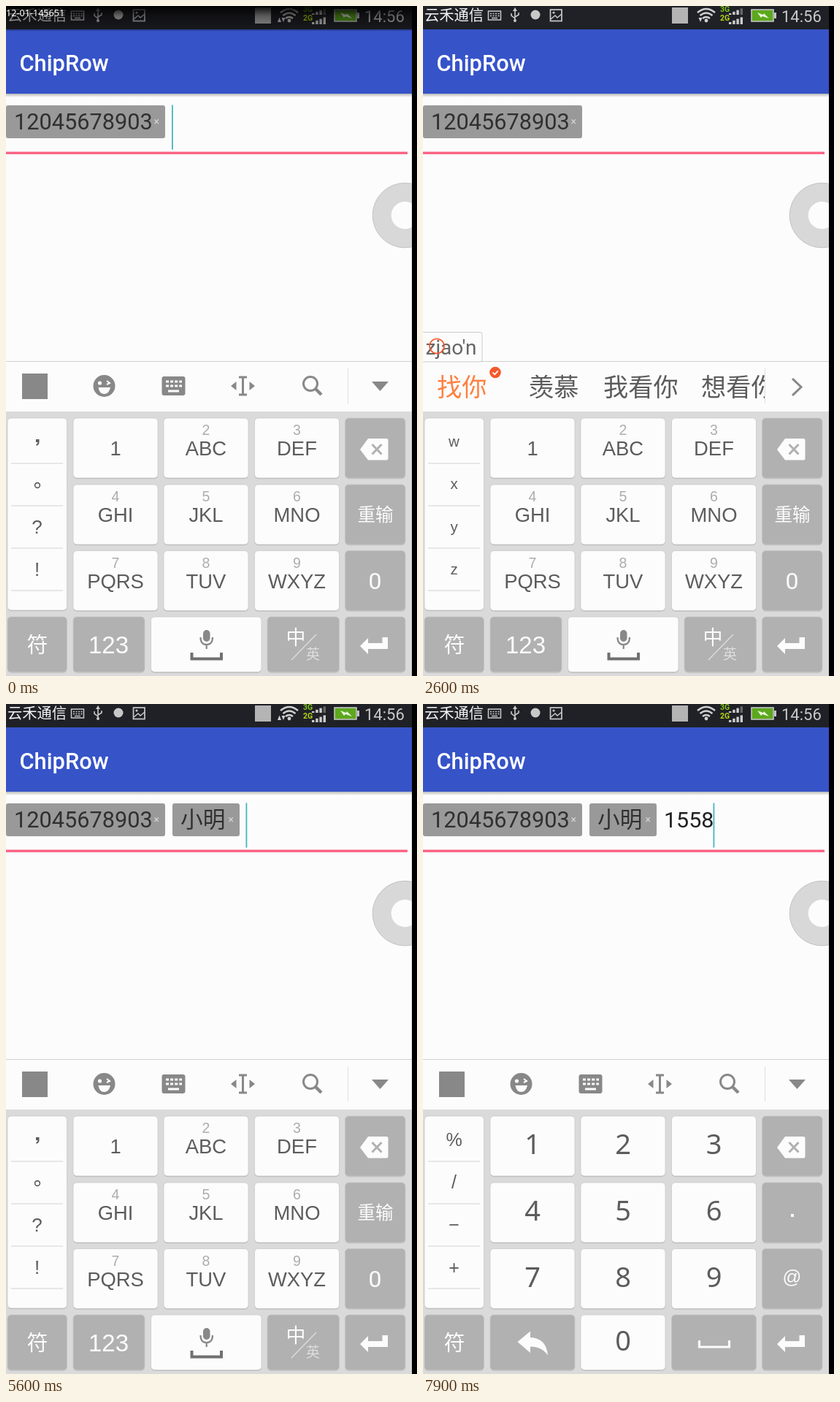
Recreate the animation shown at these times as an HTML page. Size 563 by 917 pixels, loop 8000 ms.

```html
<!DOCTYPE html>
<html lang="zh-CN">
<head>
<meta charset="utf-8">
<style>
html, body { margin: 0; width: 100%; height: 100%; overflow: hidden; background: #000; }
svg { display: block; width: 563px; height: 917px; font-family: Roboto, "Noto Sans CJK SC", "Noto Sans CJK", sans-serif; }
.key { font-family: "Liberation Sans", "Noto Sans CJK SC", "Noto Sans CJK", sans-serif; }
.num { font-family: "Noto Sans", "Open Sans", sans-serif; }
text { white-space: pre; }
</style>
</head>
<body>
<svg id="stage" viewBox="0 0 563 917"></svg>
<script>
const LOOP = 8000, STEP = 100;
const INK = '#5c5c5c', ICON = '#888', ORANGE = '#ff8040', RED = '#f4592c', GREY = '#b1b1b1', PAPER = '#fcfcfc';
const stage = document.getElementById('stage');

// Timelines: [start, value]; a value holds until the next start.
const pinyin = [[0, ''], [700, 'w'], [1000, 'wj'], [1200, 'zja'], [1400, 'zjao'], [1600, "zjao'n"],
  [2700, "zjao'ni"], [3000, "zjao'ni'm"], [3200, "xjao'ming"], [4000, '']];
const candidates = [[0, null],
  [700, [['我', 19], ['掌', 95], ['中', 162], ['讯', 227], ['在', 294], ['有', 360], ['要', 426]]],
  [1000, [['我就', 19], ['下降', 112], ['文件', 212], ['许久', 312], ['眼睛', 412]]],
  [1200, [['找', 19], ['需', 145], ['小', 212], ['要', 279], ['照', 346], ['咬', 413]]],
  [1600, [['找你', 19], ['羡慕', 145], ['我看你', 247], ['想看你', 381]]],
  [2700, [['找你', 19], ['咬你', 145], ['我看你', 247], ['想看你', 381]]],
  [3000, [['找你们', 19], ['小米', 179], ['想你们', 281], ['找你', 415]]],
  [3200, [['小名', 19], ['小明', 145], ['WLAN明', 247], ['WLAN名', 408]]],
  [4000, [['同学', 19], ['说', 124], ['老师', 192], ['明天', 294], ['和', 396]]],
  [5500, null]];
const pressed = [[0, ''], [600, 'WXYZ'], [700, ''], [900, 'JKL'], [1000, ''], [1100, 'ABC'], [1200, ''],
  [1300, 'MNO'], [1400, ''], [1500, 'MNO'], [1600, ''], [5400, 'space'], [5600, ''], [6800, '123'], [6900, ''],
  [7200, '1'], [7300, ''], [7500, '5'], [7600, ''], [7700, '5'], [7800, '8'], [7900, '']];
const typed = [[0, ''], [4000, '小明'], [5500, ''], [7200, '1'], [7500, '15'], [7700, '155'], [7900, '1558']];
const caretX = [[0, 228], [4000, 290], [5500, 329.5], [7200, 347], [7500, 364], [7700, 381], [7900, 398.5]];
const caretToggles = [0, 500, 1000, 1500, 2000, 2600, 3000, 3500, 4000, 4600, 5000, 5400, 5600, 6000, 6400, 6900, 7200];

const at = (list, t) => list.filter(([start]) => start <= t).pop()[1];
const rect = (x, y, w, h, fill, extra = '') => `<rect x="${x}" y="${y}" width="${w}" height="${h}" fill="${fill}" ${extra}/>`;
const circle = (x, y, r, fill, extra = '') => `<circle cx="${x}" cy="${y}" r="${r}" fill="${fill}" ${extra}/>`;
const path = (d, fill, extra = '') => `<path d="${d}" fill="${fill}" ${extra}/>`;
const line = (d, color, width, extra = '') => path(d, 'none', `stroke="${color}" stroke-width="${width}" ${extra}`);
const text = (s, x, y, size, fill, extra = '') => `<text x="${x}" y="${y}" font-size="${size}" fill="${fill}" ${extra}>${s}</text>`;
const label = (s, x, y, size, fill, cls = 'key') => text(s, x, y, size, fill, `text-anchor="middle" class="${cls}"`);

function statusBar(t) {
  let s = rect(0, 0, 556, 32, '#202126') + text('云禾通信', 2, 20, 20.3, '#f4f4f4');
  s += rect(89.5, 7, 17, 12, 'none', 'stroke="#c8c8c8" stroke-width="1.5"');
  s += line('M92 10.5H105M92 13.5H105', '#c8c8c8', 1.7, 'stroke-dasharray="2 1.5"') + line('M94 16.5H102', '#c8c8c8', 1.5);
  s += line('M126 5V20M121 10V13L126 17M131 9V12L126 15', '#c8c8c8', 1.6) + circle(126, 20, 2, '#c8c8c8') + path('M123 7L126 2L129 7Z', '#c8c8c8');
  s += circle(154, 12, 6.5, '#c8c8c8');
  s += rect(174.5, 5, 15.5, 15.5, 'none', 'stroke="#c8c8c8" stroke-width="1.7"') + line('M175 18L181 13L184 16L190 11', '#c8c8c8', 1.5) + circle(179, 9, 1.6, '#c8c8c8');
  s += rect(341, 2, 22, 22, '#b4b4b4');
  s += line('M376 9Q388 -1 400 9M379.5 13Q388 6 396.5 13M383 17Q388 13 393 17', '#d0d0d0', 2.4) + circle(388, 20, 2.4, '#d0d0d0');
  if (t < 1300 || (t >= 2600 && t < 6200)) {
    s += path('M377.5 16H382.5L380 22Z', '#d0d0d0');
    if (t < 1300 || t >= 5200) s += path('M372 22H377L374.5 15.5Z', '#d0d0d0');
  }
  s += text('3G', 407, 8, 10.5, '#80c41c', 'font-weight="700"') + text('2G', 407, 20, 10.5, '#b4d614', 'font-weight="700"');
  for (let i = 0; i < 4; i++) {
    const x = 419 + i * 5.2;
    s += rect(x, 10 - i * 2.2, 3.4, 2 + i * 2.2, i < 3 ? '#ccc' : '#666') + rect(x, 22 - i * 2.2, 3.4, 3 + i * 2.2, '#ccc');
  }
  s += rect(450, 5, 30, 16, '#5ca81d', 'stroke="#c4c4c4" stroke-width="1.6"') + rect(481, 9, 3, 8, '#c4c4c4');
  s += path('M458 9L466 12L467 10L474 17L465 14L463 16Z', '#e8f4dc') + text('14:56', 491, 21.5, 22, '#c9c9c9');
  const veil = Math.max(0, Math.min(1, (2000 - t) / 800));
  if (veil) s += `<g opacity="${veil}">` + rect(0, 0, 556, 34, 'url(#veil)') + text('12-01-145651', 0, 14, 12.6, '#fff', 'class="num"') + '</g>';
  return s;
}

function tag(s, x, w) {
  return rect(x, 136, w, 45, '#999', 'rx="3"') + text(s, x + 11, 169, 30.7, '#303030') + text('×', x + w - 15.5, 163, 14, '#d8d8d8');
}

function field(t) {
  let s = tag('12045678903', 0, 218);
  const hasName = t >= 5500;
  if (hasName) s += tag('小明', 228, 92);
  s += text(at(typed, t), hasName ? 330 : 228, 169, 30.4, '#202020');
  s += rect(0, 199.5, 550, 3.3, '#fb5f80');
  if (caretToggles.filter(c => c <= t).length % 2) s += rect(at(caretX, t) - 1, 135.5, 1.8, 61, '#45b5c4');
  return s;
}

function toolbar() {
  const blink = line('M138 513L142 516L138 518', PAPER, 2);
  let s = rect(22, 503, 35, 35, ICON);
  s += circle(134.5, 520, 15, ICON) + circle(128.5, 516, 2.6, PAPER) + blink + path('M126.5 522H143Q141 531 134.5 531Q128 531 126.5 522Z', PAPER);
  s += rect(213.5, 507, 32, 26, ICON, 'rx="3"');
  s += line('M219 514H241M219 520H241', PAPER, 3.2, 'stroke-dasharray="4 2.1"') + line('M222 527H237', PAPER, 3);
  s += line('M319 508H330M324.5 508V532M319 532H330', ICON, 3) + path('M308 520L315.5 514V526ZM341 520L333.5 514V526Z', ICON);
  s += circle(417, 517, 9.5, 'none', `stroke="${ICON}" stroke-width="3"`) + line('M424 524L432 532', ICON, 4.5);
  return s + path('M501 514H524L512.5 527Z', ICON);
}

function strip(t) {
  const words = at(candidates, t), code = at(pinyin, t);
  let s = rect(0, 487, 556, 68, PAPER) + rect(0, 486, 556, 1, '#d0d0d0') + rect(468, 496, 1, 48, '#dedede');
  if (!words) return s + toolbar();
  s += '<g clip-path="url(#words)">' + words.map(([w, x], i) => text(w, x, 534, 34.2, code && !i ? ORANGE : INK)).join('') + '</g>';
  if (!code) return s + circle(512, 521, 12, '#999') + line('M507 516L517 526M517 516L507 526', PAPER, 2.4);
  s += line('M506 510L518 521.5L506 533', ICON, 3);
  if (code.length > 2) {
    const x = 31 + words[0][0].length * 34;
    s += circle(x, 501.5, 7.8, RED) + line(`M${x - 3.5} 501.5l2.7 2.8l4.6 -5`, '#fff', 1.8);
  }
  s += `<rect id="bubble" x="-5" y="446.5" height="40.5" rx="3" fill="${PAPER}" stroke="#ccc"/>`;
  s += text(code, 3.5, 477, 28, '#666', 'id="code"');
  if (code.length > 2) s += circle(19, 465.5, 10, 'none', `stroke="${RED}" stroke-width="1.6"`);
  return s;
}

function button(x, y, w, h, fill = PAPER) {
  return rect(x, y + 1.2, w, h, '#bdbdbd', 'rx="5"') + rect(x, y, w, h, fill, 'rx="5" stroke="#c6c6c6" stroke-width=".7"');
}

function sideColumn(t, digits) {
  const words = at(candidates, t);
  let s = button(2, 564, 81.5, 263);
  for (const y of [626, 684, 742, 800]) s += rect(7, y - .5, 71, 1, '#d3d3d3');
  if (digits) return s + [...'%/−+'].map((c, i) => label(c, 42.5, 605 + i * 58.2, 25, INK)).join('');
  if (words && t < 4000) return s + [...'wxyz'].map((c, i) => label(c, 42.5, 603 + i * 58.4, 20.5, INK)).join('');
  return s + path('M41 593h4.5v4q0 4 -4 5v-2q2 -1 2 -3h-2.5Z', INK) + circle(43, 656, 3.4, 'none', `stroke="${INK}" stroke-width="1.6"`)
    + label('?', 42.5, 722, 26, INK) + label('!', 42.5, 780, 26, INK);
}

function keyboard(t) {
  const digits = t >= 6900, down = at(pressed, t);
  const white = id => down === id ? '#e3e3e3' : PAPER;
  const rows = [564, 655, 745.5], cols = [92, 216, 340.5];
  const names = ['1', 'ABC', 'DEF', 'GHI', 'JKL', 'MNO', 'PQRS', 'TUV', 'WXYZ'];
  let s = rect(0, 555, 556, 362, '#dadada') + sideColumn(t, digits);
  names.forEach((name, i) => {
    const x = cols[i % 3], y = rows[i / 3 | 0], mid = x + 58, id = digits ? String(i + 1) : name;
    s += button(x, y, 116, 82, white(id));
    if (digits) s += label(id, mid, y + 52, 38, INK, 'num');
    else s += label(name, mid, y + 51, 27.4, INK) + (i ? label(i + 1, mid, y + 23, 19.5, '#adadad') : '');
  });
  for (const y of rows) s += button(464.5, y, 82.5, 82, GREY);
  s += path('M485 607L496 592H521Q523.5 592 523.5 594.5V619Q523.5 621.5 521 621.5H496Z', PAPER) + line('M501.5 600L514.5 613.5M514.5 600L501.5 613.5', GREY, 3);
  if (digits) s += rect(504, 698, 4, 4, PAPER) + label('@', 505.5, 793, 25.5, PAPER);
  else s += label('重输', 506, 705, 24.5, PAPER) + label('0', 505.5, 798, 32, PAPER, '');

  s += button(2, 836, 81.5, 75.5, GREY) + label('符', 43, 885, 29, PAPER) + button(464.5, 836, 82.5, 75.5, GREY);
  s += path('M485 876L496 865V872H515.5V864H523V880H496V887Z', PAPER);
  if (digits) {
    s += button(92, 836, 116, 75.5, GREY) + path('M129.5 873L147 858.5V867Q169 868 171 891.5Q163 879.5 147 879.5V888Z', PAPER);
    s += button(216, 836, 116, 75.5) + label('0', 274, 885, 38, INK, 'num');
    s += button(340.5, 836, 116, 75.5, GREY) + line('M378.5 871V880H419.5V871', PAPER, 3.2);
  } else {
    s += button(92, 836, 98, 75.5, down === '123' ? '#9f9f9f' : GREY) + label('123', 140.5, 886, 33, PAPER);
    s += button(198.5, 836, 151.5, 75.5, white('space')) + rect(270, 854, 9.5, 16, ICON, 'rx="4.7"');
    s += line('M266.5 864Q266.5 874 274.7 874Q283 874 283 864M274.7 874V880', ICON, 2.2) + line('M254.5 885V893.5H295V885', '#707070', 4);
    s += button(358, 836, 98.5, 75.5, GREY) + label('中', 397, 874, 27, PAPER) + line('M391 895L425 860', '#dedede', 1.3) + label('英', 420.5, 894, 19, '#dedede');
  }
  return s;
}

function render(t) {
  stage.innerHTML = `<defs>
    <linearGradient id="veil" x2="0" y2="1"><stop stop-opacity=".95"/><stop offset=".4" stop-opacity=".5"/><stop offset="1" stop-opacity=".2"/></linearGradient>
    <linearGradient id="shade" x2="0" y2="1"><stop stop-color="#b9b9b9"/><stop offset="1" stop-color="${PAPER}"/></linearGradient>
    <clipPath id="words"><rect y="487" width="468" height="68"/></clipPath></defs>`
    + rect(0, 0, 563, 917, '#000') + rect(0, 32, 556, 885, PAPER)
    + rect(0, 32, 556, 88, '#3653c8') + rect(0, 120, 556, 5, 'url(#shade)')
    + text('ChipRow', 18.5, 88.5, 30.8, '#fff', 'font-weight="500"')
    + statusBar(t) + field(t)
    + circle(546.5, 286.5, 44.3, '#d8d8d8', 'stroke="#c2c2c2"') + circle(546.5, 286.5, 18.8, PAPER)
    + strip(t) + keyboard(t) + rect(556, 0, 7, 917, '#000');
  const code = document.getElementById('code');
  if (code) document.getElementById('bubble').setAttribute('width', Math.round(code.getComputedTextLength() + 16));
}

let shown = -1;
const origin = performance.now();
function tick() {
  const elapsed = Math.max(0, performance.now() - origin) % LOOP;
  const t = Math.floor(elapsed / STEP) * STEP;
  if (t !== shown) render(shown = t);
  requestAnimationFrame(tick);
}
tick();
</script>
</body>
</html>
```
